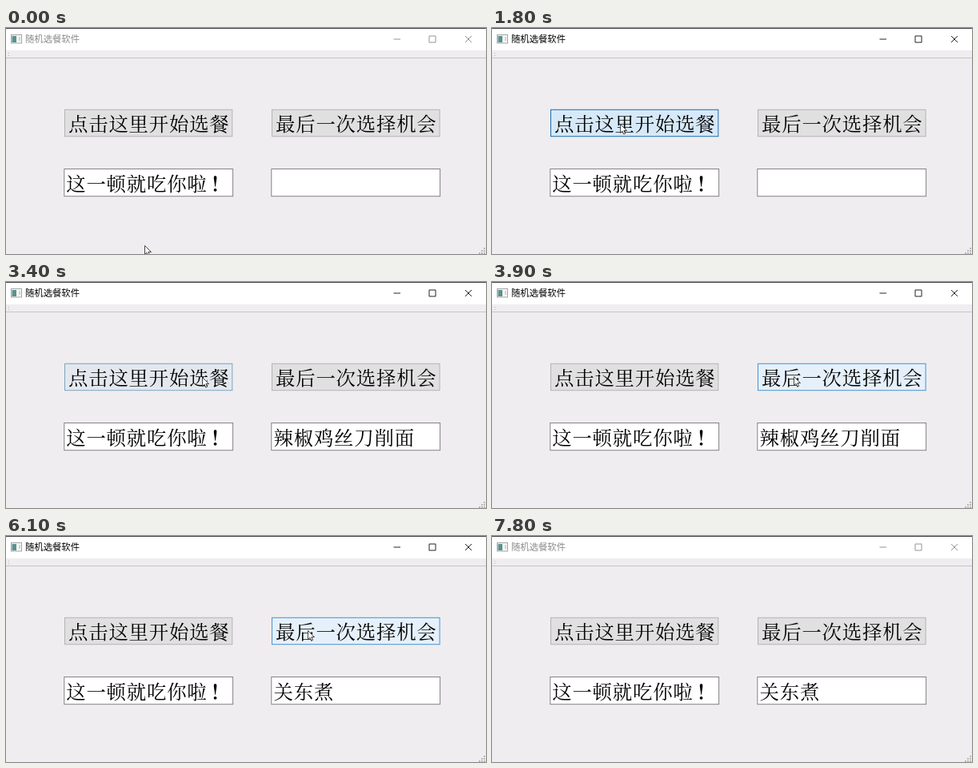
An HTML page that plays this animation: 600 px wide and 283 px high, repeating every 9.1 s.

```html
<!DOCTYPE html>
<html lang="zh-CN">
<head>
<meta charset="utf-8">
<title>随机选餐软件</title>
<style>
  html, body { margin: 0; width: 100%; height: 100%; overflow: hidden; background: #efedef; }
  svg { display: block; width: 600px; height: 283px; }
  .big { font: 300 24.4px "Noto Serif CJK SC", "Noto Sans CJK SC", "Noto Sans CJK", serif; letter-spacing: .8px; fill: #000; }
  .title { font: 11.35px "Noto Sans CJK SC", "Noto Sans CJK", sans-serif; }
  .edit { fill: #fff; stroke: #858385; }
  .mark { font-weight: 600; }
</style>
</head>
<body>
<svg viewBox="0 0 600 283">
  <rect width="600" height="283" fill="#efedef"/>
  <rect width="600" height="28" fill="#fff"/>
  <rect width="600" height="1" fill="#454348"/>
  <path d="M0 37.5H600" stroke="#c6c4c6"/>
  <path d="M3 31h1v1h-1zM3 34h1v1h-1z" fill="#b5b3b5"/>

  <rect x="6.5" y="8.5" width="13" height="10.5" fill="#f7f7f7" stroke="#a2a5a7"/>
  <rect x="7.5" y="10" width="5.5" height="8" fill="#5b918e"/>
  <path d="M17 11v5" stroke="#a9b4b8"/>
  <text id="title" class="title" x="24" y="18.1">随机选餐软件</text>
  <path id="controls" fill="none" d="M484.5 14h8.5M529 10h8v8h-8zM574 10l8 8M582 10l-8 8"/>

  <rect id="start" x="73.5" y="102.3" width="209.3" height="33.4"/>
  <rect id="retry" x="332.5" y="102.3" width="209.6" height="33.4"/>
  <rect class="edit" x="72.8" y="176.5" width="210.8" height="34.2"/>
  <rect class="edit" x="331.8" y="176.5" width="210.8" height="34.2"/>
  <text class="big" x="78" y="129">点击这里开始选餐</text>
  <text class="big" x="337" y="129">最后一次选择机会</text>
  <text class="big" x="75.2" y="204">这一顿就吃你啦<tspan class="mark" dx="4">！</tspan></text>
  <text id="dish" class="big" x="334.5" y="204"></text>

  <g id="grip" fill="#b9b7b9"></g>
  <path id="cursor" d="M.5 .5V11.5L3 9.2L4.8 13L6.6 12.2L4.9 8.5H8.5Z" fill="#fff" stroke="#333" stroke-width=".9"/>
</svg>
<script>
const LOOP = 9100, STEP = 100;
const el = id => document.getElementById(id);
const set = (id, name, value) => el(id).setAttribute(name, value);
const mix = (a, b, k) => a.map((v, i) => v + (b[i] - v) * k);
const rgb = c => `rgb(${c.map(Math.round)})`;

// Progress from 0 to 1, linear or smoothed.
const ramp = (t, from, length) => Math.min(1, Math.max(0, (t - from) / length));
const ease = (t, from, length) => {
  const k = ramp(t, from, length);
  return k * k * (3 - 2 * k);
};

const home = [173, 272];
const moves = [
  { at: 0, length: 700, to: [160, 120] },
  { at: 3100, length: 700, to: [377, 118] },
  { at: 6900, length: 400, to: [386, 268] }
];
const buttons = [
  { id: 'start', enter: 400, click: 1600, leave: 3200 },
  { id: 'retry', enter: 3400, click: 5500, leave: 6900 }
];
const skin = {
  idle:  { fill: [225, 224, 225], stroke: [180, 179, 180] },
  hover: { fill: [229, 240, 251], stroke: [70, 148, 206] },
  press: { fill: [204, 228, 247], stroke: [0, 84, 153] }
};

function paintButton({ id, enter, click, leave }, t) {
  const hover = ramp(t, enter, 400) - ramp(t, leave, 400);
  const press = .6 * (ramp(t, click, 200) - ramp(t, click + 300, 300));
  for (const part of ['fill', 'stroke']) {
    const base = mix(skin.idle[part], skin.hover[part], hover);
    set(id, part, rgb(mix(base, skin.press[part], press)));
  }
}

function draw(time) {
  const t = Math.floor(time % LOOP / STEP) * STEP;
  const active = t >= 1700 && t < 7500;
  set('title', 'fill', active ? '#000' : '#8c8a8c');
  set('controls', 'stroke', active ? '#222' : '#969496');
  buttons.forEach(b => paintButton(b, t));
  el('dish').textContent = t < 2000 ? '' : t < 5800 ? '辣椒鸡丝刀削面' : '关东煮';

  const tip = moves.reduce((p, m) => mix(p, m.to, ease(t, m.at, m.length)), home);
  set('cursor', 'transform', `translate(${tip.map(Math.round)})`);
  set('cursor', 'visibility', t < 7300 ? 'visible' : 'hidden');
}

// Resize grip: a triangle of dots.
for (let row = 0; row < 3; row++)
  for (let col = 0; col <= row; col++)
    el('grip').innerHTML += `<rect x="${597 - 3 * col}" y="${275 + 3 * row}" width="2" height="2"/>`;

const began = performance.now();
function tick() {
  draw(performance.now() - began);
  requestAnimationFrame(tick);
}
tick();
</script>
</body>
</html>
```
